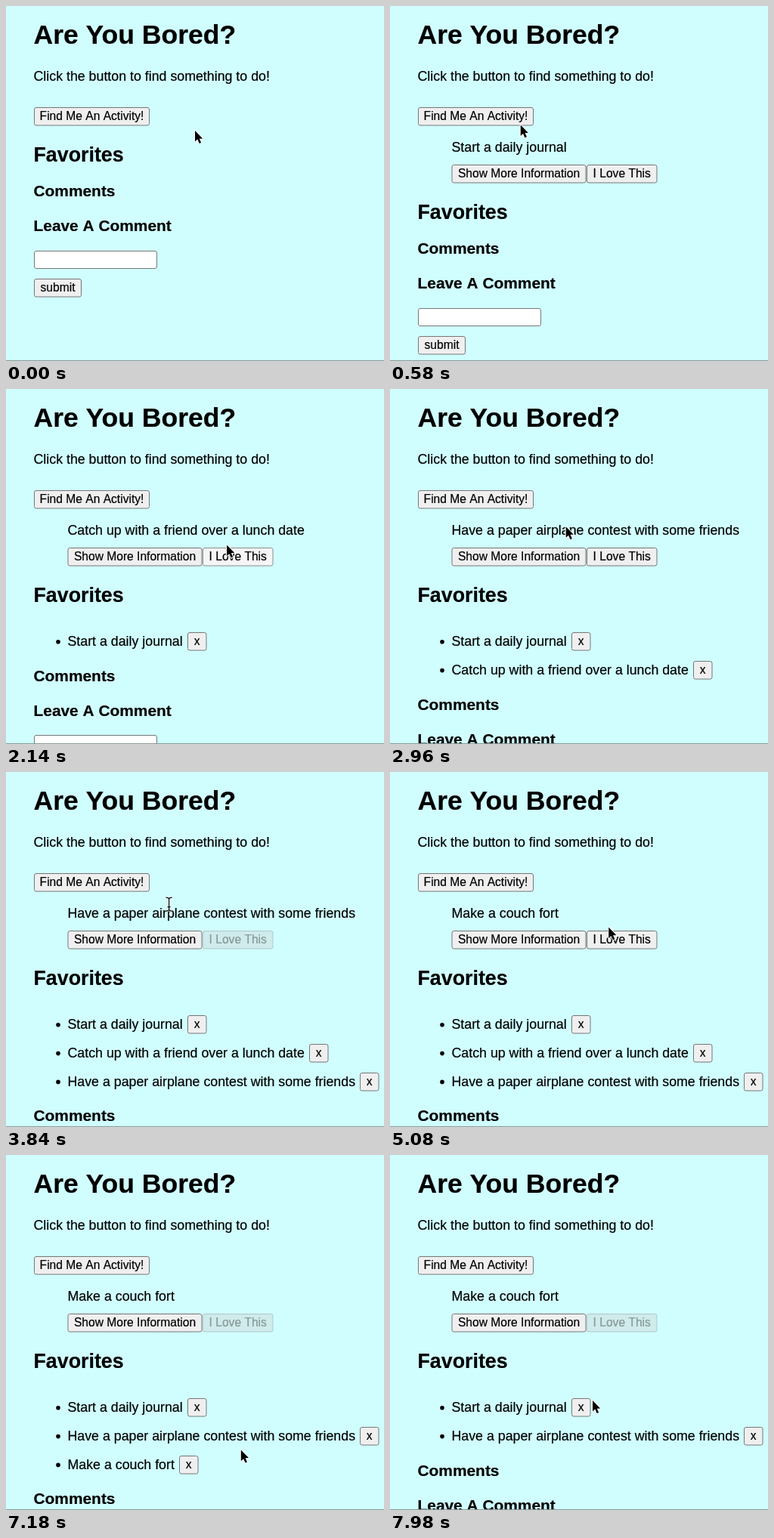
Write an HTML page with a canvas that moves like this. It is 500 by 470 pixels and loops after 8000 ms.

```html
<!DOCTYPE html>
<html lang="en">
<head>
<meta charset="utf-8">
<title>Are You Bored?</title>
<style>
  html, body { margin: 0; width: 100%; height: 100%; overflow: hidden; background: #d0feff; }
  canvas { display: block; width: 500px; height: 470px; }
</style>
</head>
<body>
<canvas id="stage"></canvas>
<script>
const LOOP = 8000, W = 500, H = 470;
const FAMILY = '"Liberation Sans", Arial, Helvetica, sans-serif';
const BODY = 17.8, LABEL = 15.6;
const LEFT = 36.5, INDENT = 81.5, ROW = 37.8, FIRST_ROW = 334;
const TRAVEL = 400, CLICK = 80;

const canvas = document.getElementById('stage');
const ctx = canvas.getContext('2d');
const dpr = window.devicePixelRatio || 1;
canvas.width = W * dpr;
canvas.height = H * dpr;
ctx.scale(dpr, dpr);

// Times in ms at which each activity is offered, loved and removed
const activities = [
  { name: 'Start a daily journal', offered: 460, loved: 840 },
  { name: 'Catch up with a friend over a lunch date', offered: 1740, loved: 2200, removed: 6880 },
  { name: 'Have a paper airplane contest with some friends', offered: 2720, loved: 3580 },
  { name: 'Make a couch fort', offered: 4700, loved: 5440, removed: 7480 }
];

const START = { x: 250, y: 165 };
const FIND = { x: 150, y: 148 };
const LOVE = { x: 293, y: 207 };

// The pointer shuttles between the two buttons, then tidies the list
const moves = [{ at: 40, to: FIND }];
activities.forEach((a, i) => {
  moves.push({ at: a.offered + 20, to: LOVE });
  if (i < activities.length - 1) moves.push({ at: a.loved + 50, to: FIND });
});
moves.push(
  { at: 5940, to: { x: 269, y: 423 } },
  { at: 6350, to: { x: 408, y: 368 } },
  { at: 6960, to: { x: 240, y: 407 } },
  { at: 7580, to: { x: 268, y: 325 } }
);

function ease(u) {
  u = Math.max(0, Math.min(1, u));
  return u * u * (3 - 2 * u);
}

function pointerAt(t) {
  return moves.reduce((p, { at, to }) => {
    const k = ease((t - at) / TRAVEL);
    return { x: p.x + (to.x - p.x) * k, y: p.y + (to.y - p.y) * k };
  }, START);
}

const pressedBefore = (time, t) => t >= time - CLICK && t < time;

function text(str, x, y, size = BODY, weight = 'normal', color = '#000') {
  ctx.font = `${weight} ${size}px ${FAMILY}`;
  ctx.fillStyle = ctx.strokeStyle = color;
  ctx.fillText(str, x, y);
  // A hairline thickens the glyphs slightly
  ctx.lineWidth = 0.2;
  ctx.strokeText(str, x, y);
}

function textWidth(str) {
  ctx.font = `${BODY}px ${FAMILY}`;
  return ctx.measureText(str).width;
}

function box(x, y, w, h, fill, stroke) {
  ctx.beginPath();
  ctx.roundRect(x + 0.5, y + 0.5, w - 1, h - 1, 2.5);
  ctx.fillStyle = fill;
  ctx.fill();
  ctx.strokeStyle = stroke;
  ctx.lineWidth = 1;
  ctx.stroke();
}

function button(label, x, y, w, { pressed = false, disabled = false } = {}) {
  const fill = disabled ? 'rgba(205,205,205,.4)' : pressed ? '#f5f5f5' : '#efefef';
  const stroke = disabled ? 'rgba(118,118,118,.35)' : pressed ? '#8d8d8d' : '#767676';
  box(x, y, w, 24.5, fill, stroke);
  ctx.textAlign = 'center';
  text(label, x + w / 2, y + 17.3, LABEL, 'normal', disabled ? 'rgba(16,16,16,.35)' : '#000');
  ctx.textAlign = 'left';
}

function arrow(x, y) {
  const shape = [[0, 0], [0, 14.6], [3.3, 11.6], [5.7, 17], [8.2, 15.9], [5.8, 10.7], [10.2, 10.5]];
  ctx.beginPath();
  for (const [dx, dy] of shape) ctx.lineTo(x + dx, y + dy);
  ctx.closePath();
  ctx.lineJoin = 'round';
  ctx.strokeStyle = '#fff';
  ctx.lineWidth = 2;
  ctx.stroke();
  ctx.fillStyle = '#000';
  ctx.fill();
}

function beam(x, y) {
  ctx.beginPath();
  for (const side of [-1, 1]) {
    ctx.moveTo(x - 4, y + side * 9);
    ctx.quadraticCurveTo(x, y + side * 9, x, y + side * 6.5);
    ctx.quadraticCurveTo(x, y + side * 9, x + 4, y + side * 9);
  }
  ctx.moveTo(x, y - 7);
  ctx.lineTo(x, y + 7);
  ctx.moveTo(x - 2, y + 3.5);
  ctx.lineTo(x + 2, y + 3.5);
  for (const [color, width] of [['#fff', 2.6], ['#000', 1.2]]) {
    ctx.strokeStyle = color;
    ctx.lineWidth = width;
    ctx.stroke();
  }
}

function drawPointer(t, current) {
  const p = pointerAt(t);
  // The pointer shape reacts a little late
  const late = pointerAt(t - 60);
  const overText = current && Math.abs(late.y - 187) < 9 &&
    late.x > INDENT && late.x < INDENT + textWidth(current.name);
  (overText ? beam : arrow)(p.x, p.y);
}

function drawActivity(a, t) {
  text(a.name, INDENT, 193);
  button('Show More Information', INDENT, 210, 178);
  button('I Love This', 260, 210, 93.5, {
    pressed: pressedBefore(a.loved, t),
    disabled: t >= a.loved
  });
}

function drawFavorite(a, row, t) {
  const y = FIRST_ROW + row * ROW;
  ctx.fillStyle = '#000';
  ctx.beginPath();
  ctx.arc(69, y + 0.8, 2.8, 0, Math.PI * 2);
  ctx.fill();
  text(a.name, INDENT, y + 6);
  button('x', Math.round(INDENT + textWidth(a.name) + 6), Math.round(y - 12), 25.5, {
    pressed: pressedBefore(a.removed, t)
  });
}

function draw(t) {
  const current = activities.filter(a => a.offered <= t).pop();
  const favorites = activities.filter(a => a.loved <= t && !(a.removed <= t));
  const finding = activities.some(a => pressedBefore(a.offered - CLICK, t));

  ctx.fillStyle = '#d0feff';
  ctx.fillRect(0, 0, W, H);

  text('Are You Bored?', LEFT, 50, 35.5, 'bold');
  text('Click the button to find something to do!', LEFT, 99);
  button('Find Me An Activity!', 37, 134, 153, { pressed: finding });
  if (current) drawActivity(current, t);

  let shift = current ? 76 : 0;
  text('Favorites', LEFT, 205.5 + shift, 26.8, 'bold');
  favorites.forEach((a, row) => drawFavorite(a, row, t));

  if (favorites.length) shift += 21 + ROW * favorites.length;
  text('Comments', LEFT, 252 + shift, 20.9, 'bold');
  text('Leave A Comment', LEFT, 298 + shift, 20.9, 'bold');
  box(37, Math.round(323.5 + shift), 163, 24, '#fff', '#767676');
  button('submit', 37, Math.round(360.5 + shift), 63);

  ctx.fillStyle = '#8b9a9a';
  ctx.fillRect(0, H - 1, W, 1);

  drawPointer(t, current);
}

const start = performance.now();
function frame() {
  draw((performance.now() - start) % LOOP);
  requestAnimationFrame(frame);
}
frame();
</script>
</body>
</html>
```
